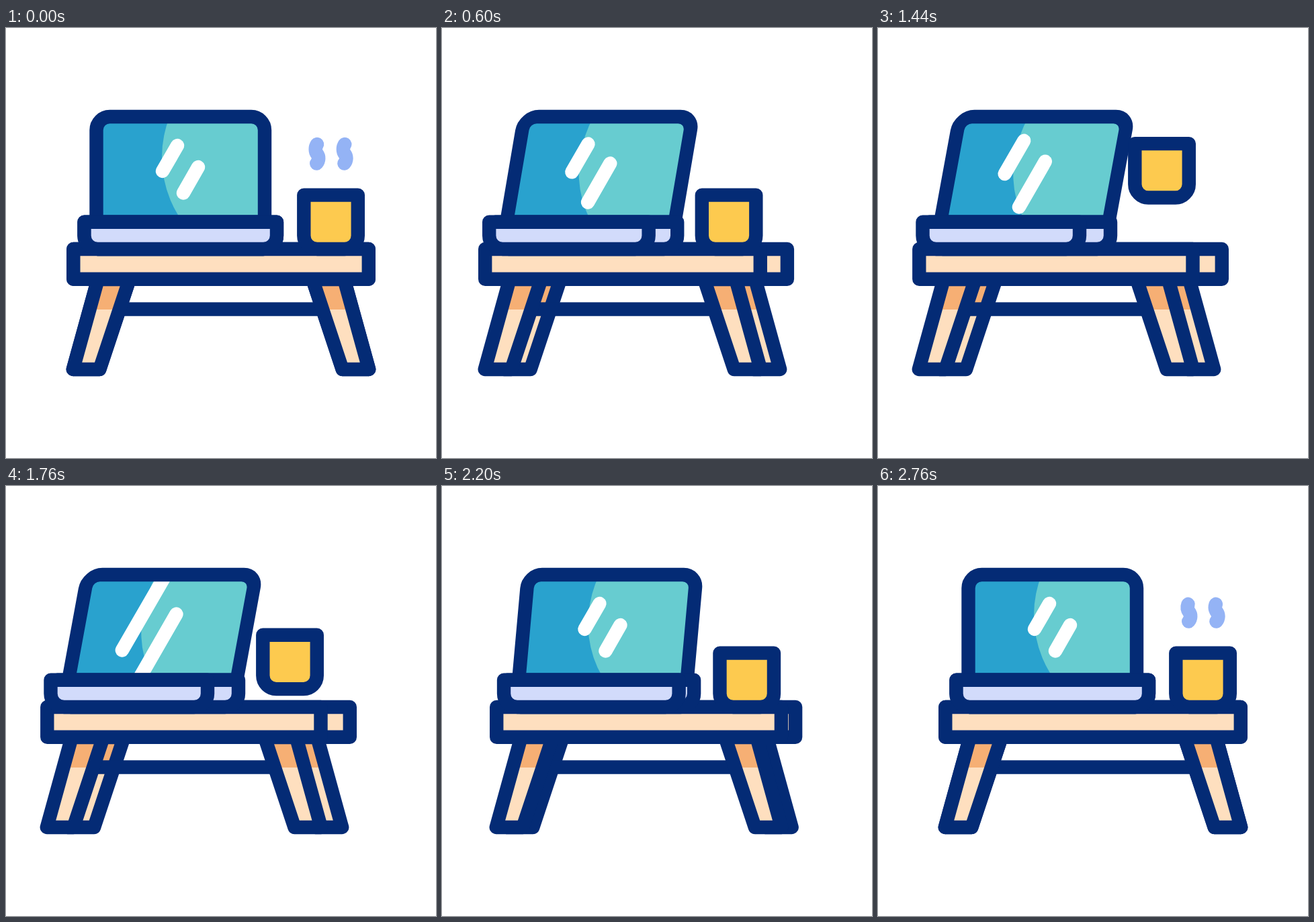
An HTML page for the animation above (2.8 s loop, 640x640 px).

```html
<!DOCTYPE html>
<html lang="en">
<head>
<meta charset="utf-8">
<title>Laptop desk</title>
<style>
  html, body { margin: 0; width: 100%; height: 100%; overflow: hidden; background: #fff; }
  svg { display: block; width: 100vw; height: 100vh; }
  .line { stroke: #042b75; stroke-width: 20.4; stroke-linejoin: round; }
  .none { fill: none; }
  .wood { fill: #fedfbf; }
  .shade { fill: #f6af74; }
  .base { fill: #d2dbfb; }
  .mug { fill: #fdca4f; }
  .bar { stroke: #fff; stroke-width: 20.4; stroke-linecap: round; }
  .steam { fill: none; stroke: #94b3f5; stroke-width: 20.6; stroke-linecap: round; }
</style>
</head>
<body>
<svg viewBox="0 0 640 640">
  <defs>
    <path id="screen" d="M134.5 288.7V152a20 20 0 0 1 20-20H365a20 20 0 0 1 20 20V288.7Z"/>
    <path id="puff" pathLength="1" d="M462.3 201.5C466 197 466 191.5 463 187.5C460 183.5 460 177.5 463 173"/>
    <g id="leg">
      <path class="wood" d="M99.8 508H139.3L183.8 374H136.8Z"/>
      <path class="shade" d="M124.4 419H168.9L183.8 374H136.8Z"/>
      <path class="line none" d="M99.8 508H139.3L183.8 374H136.8Z"/>
    </g>
    <clipPath id="glass"><use href="#screen" id="glassShape"/></clipPath>
  </defs>

  <use href="#leg" id="legBackL"/>
  <use href="#leg" id="legBackR"/>
  <path class="line" id="rail"/>
  <use href="#leg" id="legL"/>
  <use href="#leg" id="legR"/>

  <path class="line wood" id="topBack"/>
  <path class="line wood" id="topFront"/>

  <g clip-path="url(#glass)">
    <rect x="60" y="120" width="340" height="170" fill="#29a2ce"/>
    <circle id="shine" cx="397" cy="192.5" r="165" fill="#67ccd0"/>
    <path class="bar" id="bar1"/>
    <path class="bar" id="bar2"/>
  </g>
  <use href="#screen" class="line none" id="frame"/>
  <path class="line base" id="baseBack"/>
  <path class="line base" id="baseFront"/>

  <path class="line mug" id="mug" d="M443.3 248.6H523.8V309a20 20 0 0 1-20 20H463.3a20 20 0 0 1-20-20Z"/>
  <g id="steam" class="steam">
    <use href="#puff"/>
    <use href="#puff" x="41.2"/>
  </g>
</svg>
<script>
const LOOP = 2800, STEP = 40;
const $ = id => document.getElementById(id);
const set = (id, name, value) => $(id).setAttribute(name, value);
const clamp = x => Math.min(1, Math.max(0, x));
const ease = x => { x = clamp(x); return x * x * (3 - 2 * x); };
const ramp = (t, from, to) => ease((t - from) / (to - from));

// Eased value through [time, value] pairs
function keys(t, list) {
  let v = list[0][1];
  for (let i = 1; i < list.length; i++)
    v += (list[i][1] - list[i - 1][1]) * ramp(t, list[i - 1][0], list[i][0]);
  return v;
}

// Two stretches in a row, each 400 ms out and 400 ms back
function pulse(t, start) {
  const u = (t - start) / 400;
  if (u <= 0 || u >= 4) return 0;
  return ease(1 - Math.abs(u % 2 - 1));
}

const slab = (l, r) => `M${l} 329H${r}V373.7H${l}Z`;
const tray = (l, r) =>
  `M${l} 288.7H${r}V309a20 20 0 0 1-20 20H${l + 20}a20 20 0 0 1-20-20Z`;
const shift = (id, x, y = 0) => set(id, "transform", `translate(${x} ${y})`);
const flip = (id, x) => set(id, "transform", `translate(${640 + x} 0) scale(-1 1)`);
const skew = (id, p, slope, x) =>
  set(id, "transform", `matrix(1 0 ${-slope * p} 1 ${x * p} 0)`);

// Slanted bar whose ends reach further out by up and down
function bar(id, x1, y1, x2, y2, up, down) {
  set(id, "d", `M${x1 + up * 0.5} ${y1 - up * 0.866}L${x2 - down * 0.5} ${y2 + down * 0.866}`);
}

function draw(t) {
  const p = ramp(t, 200, 680) - ramp(t, 1850, 2540);

  shift("legBackL", -8.2 * p);
  flip("legBackR", -40 * p);
  set("rail", "d", `M${160 - 39 * p} 418.5H${480 - 71.3 * p}`);
  shift("legL", -39 * p);
  flip("legR", -71.3 * p);

  set("topBack", "d", slab(100.3 - 20 * p, 539.8 - 28 * p));
  set("topFront", "d", slab(100.3 - 39 * p, 539.8 - 71.3 * p));
  set("baseBack", "d", tray(116.5 - 40 * p, 403 - 57 * p));
  set("baseFront", "d", tray(116.5 - 50 * p, 403 - 103 * p));

  skew("frame", p, 0.1836, 11.5);
  skew("glassShape", p, 0.1836, 11.5);
  skew("shine", p, 0.154, 0.87);

  const x = -42 * p, a = pulse(t, 550), b = pulse(t, 460);
  bar("bar1", 255 + x, 175, 233 + x, 213, 65 * a, 36.4 * a);
  bar("bar2", 286 + x, 207, 264 + x, 245.5, 22.5 * b, 57 * b);

  const hop = keys(t, [[720, 0], [840, 3.5], [1320, -76.5], [1480, -76.5], [1960, 3], [2020, 0]]);
  shift("mug", -61 * p, hop);

  const len = t < 1400 ? clamp(1 - t / 360) : clamp((t - 2430) / 370);
  shift("steam", -61 * p);
  set("steam", "visibility", len > 0 ? "visible" : "hidden");
  set("steam", "stroke-dasharray", len < 1 ? `${len} 3` : "none");
}

const start = performance.now();
function tick() {
  const t = (performance.now() - start) % LOOP;
  draw(Math.floor(t / STEP) * STEP);
  requestAnimationFrame(tick);
}
tick();
</script>
</body>
</html>
```
